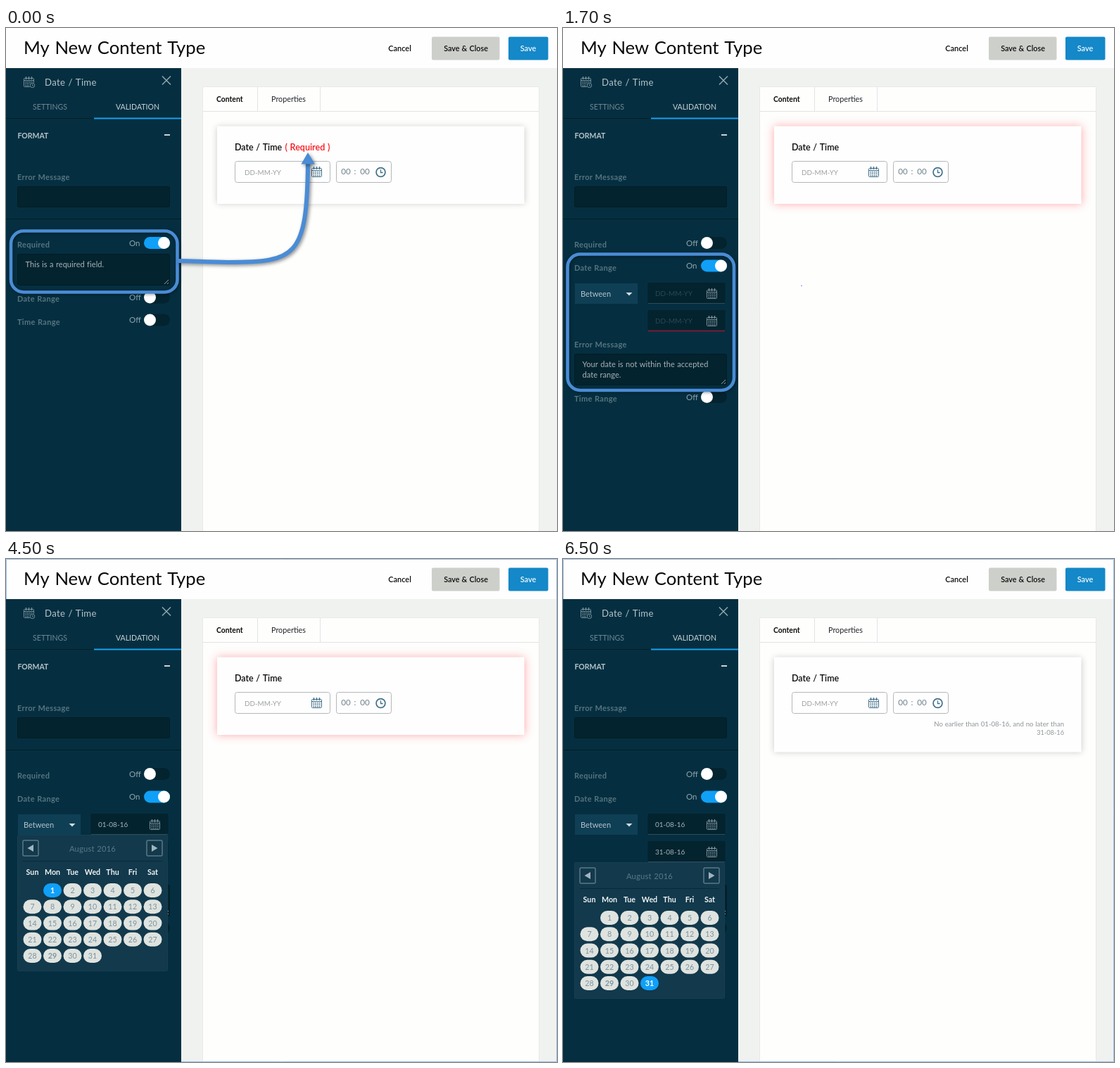
Animation, 783 px wide and 715 px high, one loop 8000 ms. Source, as an HTML page with a canvas:

```html
<!DOCTYPE html>
<html lang="en">
<head>
<meta charset="utf-8">
<title>Date field validation</title>
<style>
html, body { margin: 0; width: 100%; height: 100%; overflow: hidden; background: #fefefe; }
canvas { display: block; }
</style>
</head>
<body>
<canvas id="stage" width="783" height="715"></canvas>
<script>
const ctx = document.getElementById('stage').getContext('2d');
const LOOP = 8000;
const CUTS = [500, 2500, 4500, 6500];
const C = {
  side: '#052f40', dark: '#03232e', edge: '#021d27', label: '#56747f', soft: '#8fa4ad',
  light: '#b6c3ca', blue: '#10a0f8', mark: '#4a8cd6', icon: '#42708a', select: '#0f3f55',
  popup: '#12394c', pill: '#dfe3df', black: '#0b0b0b', under: '#2f4c59'
};

function box(x, y, w, h, fill, r = 0, stroke) {
  ctx.beginPath();
  ctx.roundRect(x, y, w, h, r);
  if (fill) { ctx.fillStyle = fill; ctx.fill(); }
  if (stroke) { ctx.strokeStyle = stroke; ctx.lineWidth = 1; ctx.stroke(); }
}

function line(points, color, width = 1) {
  ctx.beginPath();
  points.forEach(([x, y]) => ctx.lineTo(x, y));
  ctx.strokeStyle = color;
  ctx.lineWidth = width;
  ctx.stroke();
}

function poly(points, color) {
  ctx.beginPath();
  points.forEach(([x, y]) => ctx.lineTo(x, y));
  ctx.fillStyle = color;
  ctx.fill();
}

function disc(x, y, r, color) {
  ctx.beginPath();
  ctx.arc(x, y, r, 0, 7);
  ctx.fillStyle = color;
  ctx.fill();
}

function text(str, x, y, size, color, { weight = 400, align = 'left', gap = 0 } = {}) {
  ctx.font = `${weight} ${size}px Lato, "Open Sans", sans-serif`;
  ctx.letterSpacing = gap + 'px';
  ctx.wordSpacing = size * 0.04 + 'px';
  ctx.textAlign = align;
  ctx.fillStyle = color;
  ctx.fillText(str, x, y);
}

const label = (str, y) => text(str, 16, y, 11, C.label, { weight: 700, gap: 0.3 });

function shadow(color, blur, dx = 0, dy = 0) {
  ctx.shadowColor = color;
  ctx.shadowBlur = blur;
  ctx.shadowOffsetX = dx;
  ctx.shadowOffsetY = dy;
}

function calendarIcon(x, y, color) {
  box(x + 0.5, y + 2.5, 14, 12, null, 1, color);
  line([[x, y + 5.5], [x + 15, y + 5.5]], color);
  for (const dx of [3.5, 7.5, 11.5]) line([[x + dx, y], [x + dx, y + 4]], color, 1.4);
  ctx.fillStyle = color;
  for (let i = 0; i < 12; i++) ctx.fillRect(x + 2.5 + (i % 4) * 2.8, y + 7 + Math.floor(i / 4) * 2.5, 1.7, 1.4);
}

function clockIcon(x, y, r, color, width) {
  ctx.beginPath();
  ctx.arc(x, y, r, 0, 7);
  ctx.strokeStyle = color;
  ctx.lineWidth = width;
  ctx.stroke();
  line([[x, y - r * 0.6], [x, y + 0.5], [x + r * 0.5, y + 0.5]], color, width * 0.75);
}

function toggle(y, on) {
  text(on ? 'On' : 'Off', 175, y + 4, 11.5, C.soft);
  box(196, y - 8.5, 37, 17, on ? C.blue : C.dark, 8.5);
  disc(on ? 224.5 : 204.5, y, 8.5, '#fff');
}

function textarea(y, rows) {
  box(16.5, y + 0.5, 216, 44, C.dark, 2, C.edge);
  rows.forEach((row, i) => text(row, 27.5, y + 19 + i * 15, 11, '#a9b4b8', { gap: 0.08 }));
  line([[225, y + 43], [231, y + 37]], C.soft);
  line([[229, y + 43], [231, y + 41]], C.soft);
}

function dateInput(y, value, under) {
  box(120.5, y, 110, 30, C.dark, 2);
  line([[121, y + 29.5], [230, y + 29.5]], under);
  text(value || 'DD-MM-YY', 131, y + 19, 10, value ? '#a9b5ba' : '#2c4854');
  calendarIcon(204, y + 8, '#7b919b');
}

function select(open) {
  box(17, 363, 89, 29, C.select);
  text('Between', 25, 381.5, 11, C.light);
  const d = open ? -2 : 2;
  poly([[89.5, 378 - d], [98.5, 378 - d], [94, 378 + d + d / 4]], '#d3dce0');
}

function options() {
  box(17.5, 363.5, 17, 28, null, 0, '#3f78a5');
  box(16, 392, 90, 84, '#0b3c50');
  line([[17, 392.5], [106, 392.5]], '#062a39');
  text('Before', 26, 410, 10.7, '#5f7f8d');
  text('After', 26, 436.5, 10.7, '#5f7f8d');
  box(19.5, 448, 85.5, 26.5, C.dark);
  text('Between', 27, 464.5, 11, '#2f9df4');
}

function calendar(top, chosen) {
  const col = i => 37.5 + i * 28.5;
  const mid = { align: 'center' };
  const bold = { align: 'center', weight: 700 };
  box(16.5, top + 0.5, 213, 193, C.popup, 1, '#173f51');
  [[35, -1], [211, 1]].forEach(([x, dir]) => {
    box(x - 11, top + 8, 22, 22, null, 1, '#8297a1');
    poly([[x - 4 * dir, top + 14], [x - 4 * dir, top + 24], [x + 4.5 * dir, top + 19]], '#a3b3bb');
  });
  text('August 2016', 123, top + 23.5, 11.2, '#5a7987', { align: 'center', gap: 0.2 });
  line([[24, top + 37.5], [222, top + 37.5]], '#0a2b39');
  ['Sun', 'Mon', 'Tue', 'Wed', 'Thu', 'Fri', 'Sat'].forEach((d, i) =>
    text(d, col(i), top + 57, 10.7, '#f1f4f4', bold));
  for (let day = 1; day <= 31; day++) {
    const x = col(day % 7);
    const y = top + 79 + Math.floor(day / 7) * 23.25;
    const on = day === chosen;
    box(x - 13, y - 10, 26, 20, on ? C.blue : C.pill, 10);
    text(String(day), x, y + 4, 10.7, on ? '#fff' : '#7c949f', on || day === 29 ? bold : mid);
  }
}

function header() {
  const bold = { weight: 600, align: 'center' };
  box(0, 0, 783, 57, '#fefefe');
  text('My New Content Type', 25, 36.5, 25.7, C.black);
  text('Cancel', 559.5, 33, 11, C.black, bold);
  box(605, 12.5, 96.5, 33, '#cdcfcb', 2);
  text('Save & Close', 653.5, 33, 10.8, C.black, bold);
  box(714, 12.5, 56.5, 33, '#1488c8', 2);
  text('Save', 742, 33, 11, '#f4fafd', bold);
}

function formPanel(step) {
  box(279.5, 83.5, 478, 640, '#fefefd', 0, '#e8eae8');
  line([[280, 118.5], [757, 118.5]], '#e2e4e2');
  line([[357.5, 84], [357.5, 118]], '#e2e4e2');
  line([[446.5, 84], [446.5, 118]], '#e2e4e2');
  text('Content', 299, 105, 10.4, C.black, { weight: 700 });
  text('Properties', 377, 105, 10.8, '#24262c');

  const invalid = step > 0 && step < 4;
  shadow(invalid ? 'rgba(255,50,60,.42)' : 'rgba(0,0,0,.2)', invalid ? 12 : 9);
  box(300, 139.5, 436.5, step === 4 ? 135 : 110.5, '#fefefe');
  shadow('transparent', 0);

  text('Date / Time', 325, 174, 12.5, C.black, { weight: 600 });
  if (step === 0) text('( Required )', 396.5, 174, 12.6, '#f8141c', { weight: 600 });
  box(325.5, 189.5, 135, 30, '#fefefe', 3, '#b3b8ba');
  text('DD-MM-YY', 339, 208.5, 9.8, '#9ba1a4');
  calendarIcon(434, 197, C.icon);
  box(469.5, 189.5, 78, 30, '#fefefe', 3, '#b3b8ba');
  [['00', 483], [':', 496], ['00', 510]].forEach(([s, x]) =>
    text(s, x, 208, 11.7, '#71838c', { align: 'center' }));
  clockIcon(532.5, 205, 6.4, C.icon, 1.7);

  if (step === 4) {
    const right = { align: 'right' };
    text('No earlier than 01-08-16, and no later than', 712, 238, 9.6, '#8f9598', right);
    text('31-08-16', 712, 250, 9.2, '#8f9598', right);
  }
}

function sideHead() {
  box(0, 57, 249, 658, C.side);
  calendarIcon(25, 69, '#77909b');
  disc(37.5, 81.5, 4.2, C.side);
  clockIcon(37.5, 81.5, 3.2, '#77909b', 1);
  text('Date / Time', 55, 81.5, 13.2, C.light, { gap: 0.3 });
  line([[222, 68.5], [234, 80.5]], '#93a8b1', 1.5);
  line([[234, 68.5], [222, 80.5]], '#93a8b1', 1.5);
  text('SETTINGS', 62.5, 116, 10.6, '#6f8994', { align: 'center' });
  text('VALIDATION', 187, 116, 10.6, '#c7d2d7', { align: 'center' });
  line([[0, 128.5], [125, 128.5]], C.edge);
  box(125, 127.5, 124, 2, '#1b9fec');
  text('FORMAT', 16.5, 156.5, 10.5, C.light, { weight: 700 });
  box(225, 151, 8, 2, '#c9d3d8');
  label('Error Message', 215.5);
  box(16.5, 225.5, 216, 29, C.dark, 2, C.edge);
  line([[0, 271.5], [249, 271.5]], C.edge);
}

function rules(step) {
  const ranged = step > 0;
  label('Required', 312);
  toggle(305.5, !ranged);
  label('Date Range', ranged ? 344.5 : 389);
  toggle(ranged ? 338 : 383, ranged);
  label('Time Range', ranged ? 531 : 421.5);
  toggle(ranged ? 524.5 : 415, false);
  if (!ranged) return textarea(321, ['This is a required field.']);

  label('Error Message', 454);
  textarea(463, ['Your date is not within the accepted', 'date range.']);
  select(step === 2);
  dateInput(362, step > 2 && '01-08-16', C.under);
  dateInput(401, step === 4 && '31-08-16', step === 4 ? C.under : '#c5133b');
  if (step === 2) options();
  if (step === 3) calendar(392, 1);
  if (step === 4) calendar(431, 31);
}

function frameMark(x, y, w, h, r) {
  shadow('rgba(0,0,0,.4)', 4, 1, 1);
  ctx.beginPath();
  ctx.roundRect(x, y, w, h, r);
  ctx.strokeStyle = C.mark;
  ctx.lineWidth = 4.6;
  ctx.stroke();
  shadow('transparent', 0);
}

function arrow() {
  shadow('rgba(0,0,0,.45)', 5, 2, 2);
  ctx.beginPath();
  ctx.moveTo(244, 331);
  ctx.bezierCurveTo(265, 331, 285, 333, 315, 333);
  ctx.bezierCurveTo(412, 333, 428, 326, 429, 190);
  ctx.strokeStyle = C.mark;
  ctx.lineWidth = 6;
  ctx.stroke();
  poly([[429, 177], [439, 193.5], [419.5, 193.5]], C.mark);
  shadow('transparent', 0);
}

function draw(step) {
  box(0, 0, 783, 715, '#f0f2f0');
  header();
  formPanel(step);
  if (step > 2) box(0.5, 0.5, 782, 714, null, 0, '#9cc0ea');
  sideHead();
  rules(step);
  if (step === 0) {
    frameMark(7, 288.5, 236.5, 87, 18);
    arrow();
  }
  if (step === 1) {
    frameMark(6.5, 321.5, 236.5, 193.5, 18);
    box(338, 366, 2, 1, '#7f8fe0');
  }
}

function tick(now) {
  const t = now % LOOP;
  draw(CUTS.filter(c => t >= c).length);
  requestAnimationFrame(tick);
}
requestAnimationFrame(tick);
</script>
</body>
</html>
```
